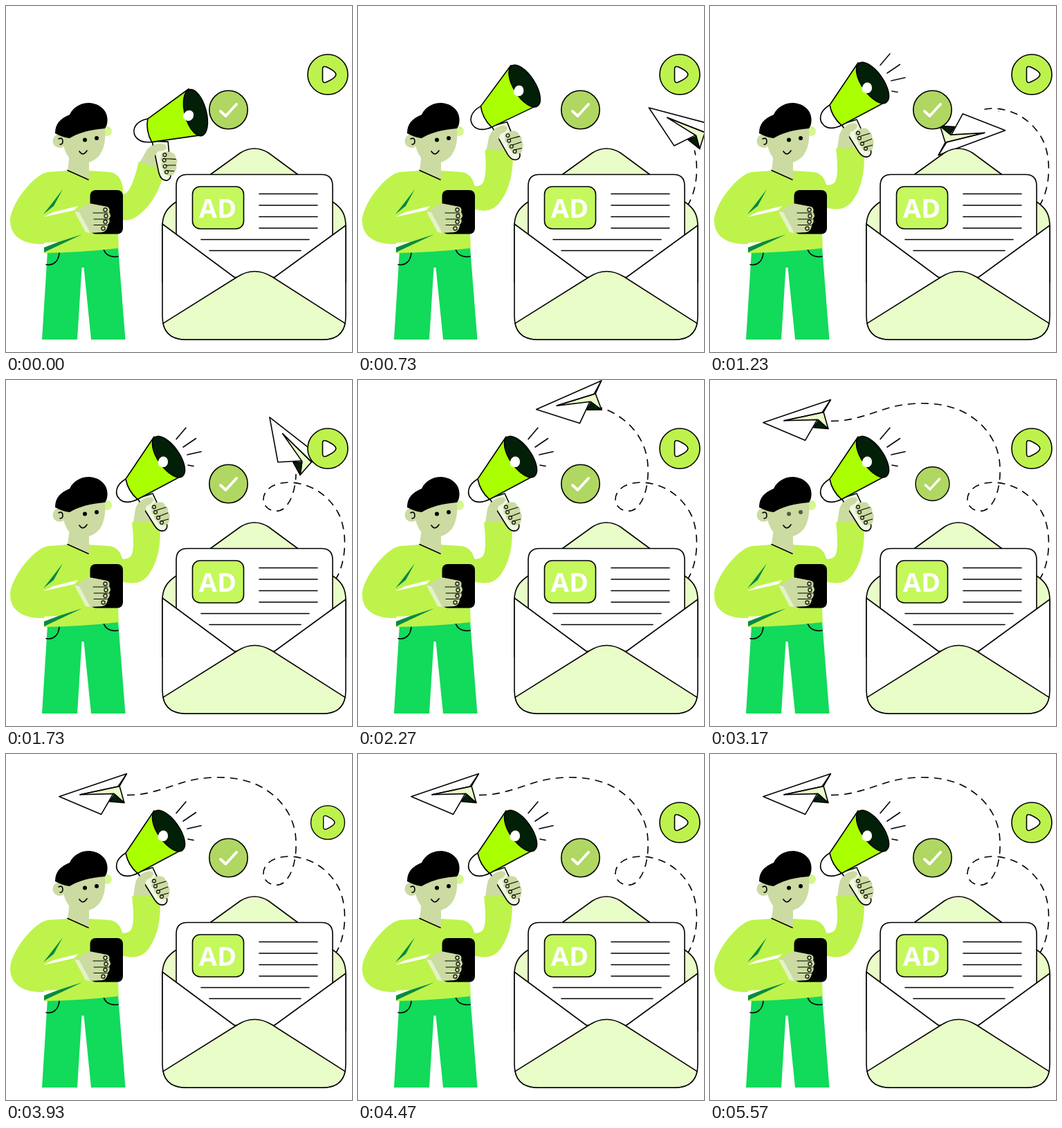
Recreate the animation shown at these times as an HTML page. Size 500 by 500 pixels, loop 6 s.

```html
<!DOCTYPE html>
<html lang="en">
<head>
<meta charset="utf-8">
<title>Ad mail</title>
<style>
html, body { margin: 0; width: 100%; height: 100%; overflow: hidden; background: #fff; }
svg { display: block; width: 100%; height: 100%; }
.ink { stroke: #000; stroke-width: 1.6; stroke-linejoin: round; stroke-linecap: round; }
.thin { stroke-width: 1.1; }
.line { fill: none; }
.white { fill: #fff; }
.pale { fill: #e9fdc8; }
.shirt { fill: #bef34b; }
.skin { fill: #cbdba2; }
.shade { fill: #078a43; }
</style>
</head>
<body>
<svg viewBox="0 0 500 500">
  <defs>
    <path id="route" d="M436 354 C452 330 466 306 477 287 C492 262 494 218 480 192 C466 166 440 149 410 148 C385 148 371 160 372 174 C373 187 390 194 401 186 C414 176 420 150 419 128 C419 98 404 66 366 46 C335 31 300 32 272 37 C246 42 222 55 192 58.500 C170 60.500 150 59 125 57 L85 57"/>
    <mask id="reveal" maskUnits="userSpaceOnUse" x="0" y="0" width="500" height="500">
      <use id="trace" href="#route" fill="none" stroke="#fff" stroke-width="8"/>
    </mask>
  </defs>

  <g mask="url(#reveal)">
    <use href="#route" fill="none" stroke="#000" stroke-width="1.6" stroke-dasharray="11 8"/>
  </g>

  <g id="plane" class="ink">
    <path class="white" d="M77 62 L174 28 L155 57 L138 87 Z"/>
    <path class="pale" d="M107 59 L164 46 L171 70 L156 57 Z"/>
    <path fill="#022008" d="M157 58 L171 70 L150 68.500 Z"/>
    <path class="line" d="M107 59 L164 46 L174 28"/>
  </g>

  <g id="play">
    <circle class="ink" cx="465" cy="99" r="29" fill="#bdf24d"/>
    <path class="ink white" d="M457.500 91 Q457.500 86 463 88 Q472 92 475.500 96 Q478 99 475.500 102 Q472 106 463 110 Q457.500 112 457.500 107 Z"/>
  </g>
  <g id="check">
    <circle class="ink" cx="321.500" cy="150" r="27.700" fill="#afd761"/>
    <path class="line" d="M310 152 L317.500 159 L333 142" stroke="#fff" stroke-width="4" stroke-linecap="round" stroke-linejoin="round"/>
  </g>

  <!-- envelope -->
  <g class="ink">
    <path class="pale" d="M226 318 C226 300 234 291 246 283 L296 243 L339 212 Q359 200 379 212 L421 243 L472 283 C484 291 491 300 491 318 V400 H226 Z"/>
    <path class="white" d="M246 400 V260 Q246 243.500 262 243.500 H456 Q472 243.500 472 260 V400 Z"/>
    <rect x="269.500" y="261" width="74" height="61" rx="11" fill="#c4f85c"/>
    <path class="line" d="M366 271.500H450 M366 288H450 M366 304.500H450 M366 321H450 M282 337.500H438 M294 353.500H426"/>
    <path class="white" d="M226 315 L330 392 H388 L491 317 V448 Q491 482 458 482 H260 Q226 482 226 448 Z"/>
    <path class="pale" d="M227 458.600 L335 391 Q359 376 384 391 L490 458.600 Q485.400 482 458 482 H260 Q231.800 482 227 458.600 Z"/>
  </g>
  <text x="306" y="306" text-anchor="middle" font-family="'Open Sans', 'Noto Sans', sans-serif" font-weight="700" font-size="38" fill="#fff">AD</text>

  <!-- raised arm with megaphone -->
  <g id="arm">
    <path class="skin" d="M183 212 L187 186 Q192 172 202 170 Q212 168 213 174 Q212 178 206 181 L213 212 Z"/>
    <path class="shirt" d="M132 243 L160 256 Q172 262 180 255 Q187 246 182 205.500 Q203 206 222 204 C225 236 220 264 204 284 C192 297 176 296 150 285 L132 275 Z"/>
    <path class="ink" fill="#f1f7e2" d="M190 171 L215 211 Q222 221 230 217 Q235 213 231 205 L212 164 Z"/>
    <path class="skin" d="M187 189 Q191 174 203 170 Q213 168 213 174 Q211 179 203 182 L199 196 Z"/>
    <path class="skin" d="M211 181 C217 175 229 175 230 182 C235 184 235 189 234 191 C238 195 237 200 235 201 C238 206 232 210 226 210 Q221 210 219 204 Q213 200 214 195 Q208 191 211 188 Q207 184 211 181 Z"/>
    <g class="ink line thin">
      <path d="M218 188 L231 184 M221 197 L234 192 M224 204 L235 201"/>
      <circle cx="214" cy="183.500" r="2.400"/><circle cx="216" cy="191" r="2.400"/>
      <circle cx="220" cy="199" r="2.400"/><circle cx="225" cy="206" r="2.400"/>
    </g>
    <g class="ink">
      <path class="white" d="M173 143 C158 152 156 165 165 173 C173 179 183 176 191 172 Z"/>
      <path fill="#aaff00" d="M173 143 L214 82 L253 139 L190 172.500 Q176 160 173 143 Z"/>
      <ellipse cx="235" cy="111" rx="34.500" ry="15.500" transform="rotate(55 235 111)" fill="#022008"/>
    </g>
    <path class="white" d="M220 123 C218 112 228 107 232.500 113 C236 119 233 125 228 126 Q223 126 220 123 Z"/>
  </g>
  <path id="rays" class="ink line" d="M246 85.500 L260 69 M256 97 L274.500 84.500 M262 108 L282 103.500 M263 123 L271 124.500"/>

  <!-- body -->
  <path fill="#12da5b" d="M60 354 L162 348 Q166 400 172.500 482 H123 L112.500 378 H109.500 L103 482 H52 Z"/>
  <path class="ink line" d="M58 373.500 C68 376 76 369 77 357 M141 351 C143 359 151 364 162 362"/>
  <path class="shirt" d="M88 238 L60 240 C40 244 8 284 6 309 C6 335 27 345 55 344 V357 Q110 356 163 350 L162 329 L169 292 V262 Q165 242 150 240 L119 238 Z"/>
  <path class="white" d="M54 305 L68 298 L104 289 L99 295 Z M55 342 L76 341 L55 349 Z"/>
  <path class="shade" d="M82 265 L54 301 L69 289 Z M76 341 L110 330 L55 356 V349 Z"/>
  <path class="skin" d="M92 214 H120 V250 L89 238 Z"/>
  <path class="ink line" d="M89 237.500 L119 251"/>

  <!-- head -->
  <circle cx="146" cy="181" r="7" fill="#d5f78c"/>
  <circle class="skin" cx="77.500" cy="195" r="10"/>
  <path class="skin" d="M80 182 L142 171 C145 190 143 206 134 217 C122 230 101 230 91 219 Q82 208 80 182 Z"/>
  <path d="M71 184 C71 170 78 163 92 157 C97 146 108 140 120 140 C136 141 146 151 146.500 163 Q147 172 143 177 Q112 179 92 191 Q82 190 71 184 Z"/>
  <path class="ink line" d="M76 192 Q82 189 82 196 Q82 200 78 200 M106 210 Q111 218 117 209"/>
  <g id="eyes"><circle cx="114" cy="193.500" r="3"/><circle cx="131" cy="191" r="3"/></g>

  <!-- phone and hand -->
  <rect x="121.500" y="266" width="47.500" height="63.500" rx="8"/>
  <path class="skin" d="M99 297 L120 285 L146 290 Q151 292 149 298 Q153 303 149 307 Q151 313 147 316 Q147 325 139 327 L121 328 Z"/>
  <path fill="#e5f2c9" d="M99 297 L106 298 L122 328 L115 327 Z"/>
  <g class="ink line thin">
    <path d="M126 299 H147 M127 308 H148 M127 316.500 H146"/>
    <circle cx="143.500" cy="294.500" r="2.600"/><circle cx="144.500" cy="303.500" r="2.600"/>
    <circle cx="143.500" cy="312" r="2.600"/><circle cx="140.500" cy="321.500" r="2.600"/>
  </g>
</svg>
<script>
const LOOP = 6000;
const $ = id => document.getElementById(id);
const route = $('route');
const tail = 46;     // distance from the plane's centre to its tail
const runOut = 40;   // straight end of the route, used only for heading
const flight = [[0, 0], [730, 205], [1730, 453], [2270, 581], [3050, route.getTotalLength() - runOut]];

const progress = (t, from, to) => Math.min(1, Math.max(0, (t - from) / (to - from)));
const ease = p => (1 - Math.cos(Math.PI * p)) / 2;

function travelled(t) {
  let i = 1;
  while (i < flight.length - 1 && t > flight[i][0]) i++;
  const [t0, s0] = flight[i - 1], [t1, s1] = flight[i];
  return s0 + (s1 - s0) * progress(t, t0, t1);
}

function pulse(id, x, y, t, start) {
  const k = 1 - 0.2 * Math.sin(Math.PI * progress(t, start, start + 700));
  $(id).setAttribute('transform', `translate(${x} ${y}) scale(${k}) translate(${-x} ${-y})`);
}

function blink(t, start) {
  return 1 - Math.abs(2 * progress(t, start, start + 300) - 1);
}

function fly(t) {
  const s = travelled(t);
  const at = route.getPointAtLength(s);
  const back = route.getPointAtLength(Math.max(0, s - 5));
  const ahead = route.getPointAtLength(s + 30);
  const final = Math.atan2(ahead.y - back.y, ahead.x - back.x) * 180 / Math.PI - 180;
  const plane = $('plane');
  plane.setAttribute('visibility', t < 30 ? 'hidden' : 'visible');
  plane.setAttribute('transform', `translate(${at.x} ${at.y}) rotate(${final}) translate(-125 -57)`);
  $('trace').setAttribute('stroke-dasharray', `${Math.max(0, s - tail)} 2000`);
}

function draw(t) {
  fly(t);
  $('arm').setAttribute('transform', `rotate(${20 * (1 - ease(progress(t, 0, 950)))} 132 243)`);
  $('rays').setAttribute('opacity', progress(t, 950, 1250));
  pulse('check', 321.5, 150, t, 3030);
  pulse('play', 465, 99, t, 3730);
  $('eyes').setAttribute('opacity', 1 - blink(t, 3110) - blink(t, 5270));
}

const begin = performance.now();
function tick() {
  draw((performance.now() - begin) % LOOP);
  requestAnimationFrame(tick);
}
tick();
</script>
</body>
</html>
```
